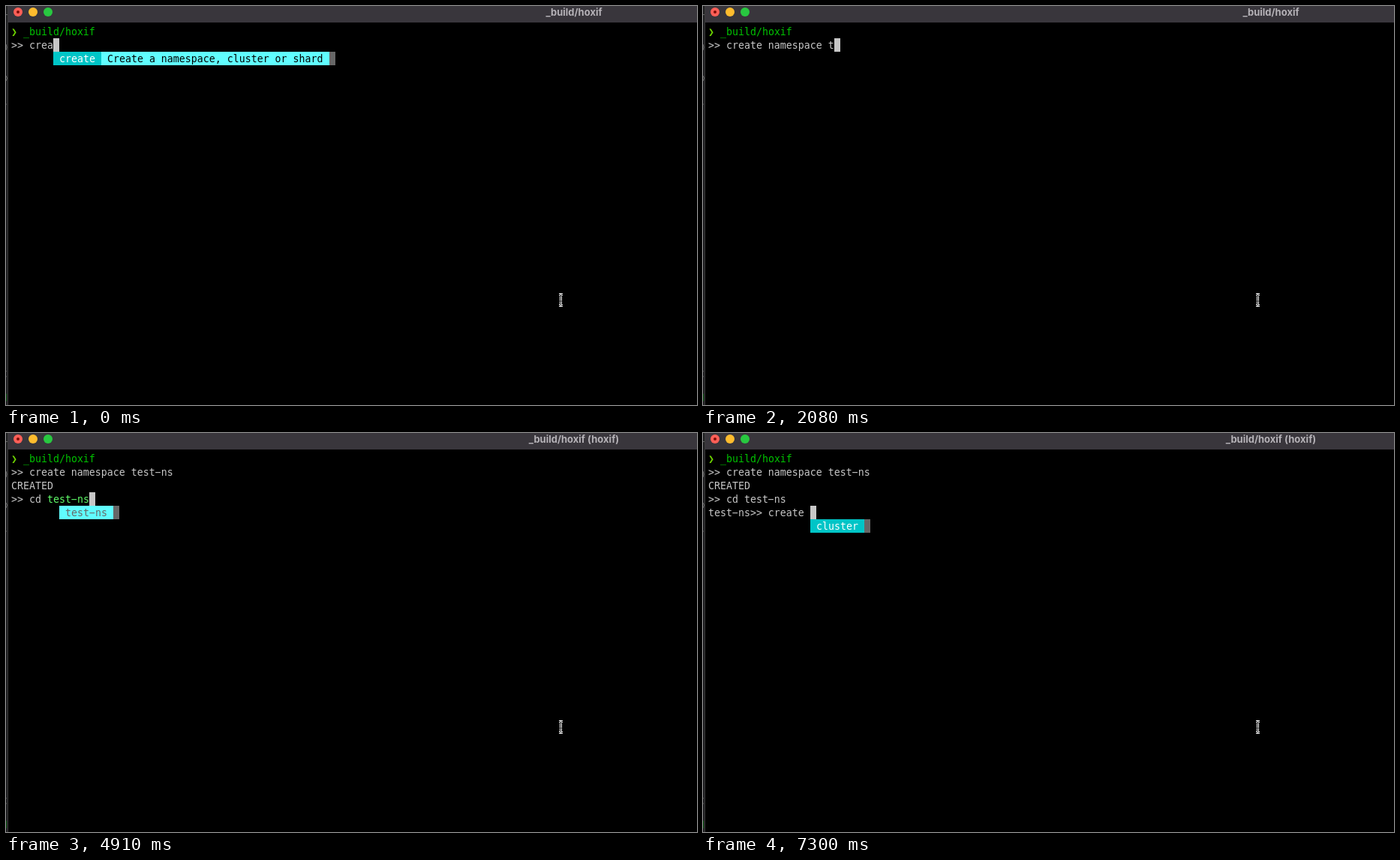
Write an HTML page that moves like this. It is 921 px wide and 532 px high and loops after 8 s.

```html
<!DOCTYPE html>
<html lang="en">
<head>
<meta charset="utf-8">
<title>Terminal</title>
<style>
  html, body { margin: 0; width: 100%; height: 100%; overflow: hidden; background: #000; }
  #stage { position: relative; width: 921px; height: 532px; overflow: hidden; background: #000; }
  #bar { position: absolute; left: 3px; right: 0; top: 0; height: 22px; background: #39363c; }
  #title { position: absolute; left: 657px; top: -1px; width: 200px; text-align: center;
    font: 700 13px/18px Inter, sans-serif; color: #b5b2b7; white-space: pre; }
  svg { position: absolute; left: 0; top: 0; }
  #screen { position: absolute; left: 7px; top: 25px; font: 13.288px/20px "DejaVu Sans Mono", monospace; color: #c7c7c7; }
  #screen span { position: absolute; height: 18px; white-space: pre; }
  #screen .arrow { color: #6fd700; }
  #screen .path { color: #00c200; }
  #screen .preview { color: #5ffa68; }
  #screen .cursor { background: #c7c7c7; }
  #screen .word { background: #00c5c7; color: #fff; }
  #screen .note { background: #60fdff; color: #000; }
  #screen .word.on { background: #60fdff; color: #686868; }
  #screen .note.on { background: #00c5c7; color: #fff; }
  #screen .thumb { background: #676767; }
</style>
</head>
<body>
<div id="stage">
  <div id="bar"></div>
  <div id="title"></div>
  <svg width="921" height="532" viewBox="0 0 921 532" fill="none">
    <path d="M1 0V532" stroke="#1f1f21" stroke-width="2"/>
    <path d="M2.5 0V532" stroke="#3a3a3a"/>
    <path d="M0 11.5h2M0 131h1M0 486v2M0 494h1" stroke="#666"/>
    <path d="M0 51q2 4 0 8M0 93q3 3 0 7" stroke="#777"/>
    <path d="M.5 517v10" stroke="#0d5a14"/>
    <circle cx="16" cy="8" r="6" fill="#ff5f57"/>
    <circle cx="16" cy="8" r="2" fill="#7d0d08"/>
    <circle cx="36" cy="8" r="6" fill="#febc2e"/>
    <circle cx="56" cy="8" r="6" fill="#28c840"/>
    <defs>
      <path id="beam" d="M737 384.500h1.500l1 1 1-1h1.500M739.500 385.500v13M737 399.500h1.500l1-1 1 1h1.500M738.500 393.500h2"/>
    </defs>
    <use href="#beam" stroke="#fff" stroke-width="3"/>
    <use href="#beam" stroke="#000"/>
  </svg>
  <div id="screen"></div>
</div>
<script>
const LOOP = 8000, CELL = 8, ROW = 18;
const NAME = 'hoxif', APP = `_build/${NAME}`;
const screenEl = document.getElementById('screen');
const titleEl = document.getElementById('title');

const create = ['create', 'Create a namespace, cluster or shard'];
const enter = ['cd', 'Enter a namespace, cluster or shard'];
const menus = {
  create: [create],
  both: [enter, create],
  namespace: [['namespace']],
  cluster: [['cluster']],
  space: [['test-ns']]
};

const made = ['>> create namespace test-ns', 'CREATED'];
const entered = [...made, '>> cd test-ns'];
const first = { past: [], prompt: '>> ' };
const second = { past: made, prompt: '>> ' };
const waiting = { past: entered, prompt: '' };
const third = { past: entered, prompt: 'test-ns>> ' };

// start time, session, typed text, menu, chosen suggestion
const steps = [
  [0, first, 'crea', 'create'],
  [290, first, 'creae'],
  [740, first, 'creat', 'create'],
  [890, first, 'create', 'create'],
  [1040, first, 'create', 'create', 'create'],
  [1340, first, 'create ', 'namespace'],
  [1490, first, 'create n', 'namespace'],
  [1630, first, 'create n', 'namespace', 'namespace'],
  [2080, first, 'create namespace t'],
  [2230, first, 'create namespace te'],
  [2380, first, 'create namespace tes'],
  [2530, first, 'create namespace test'],
  [2820, first, 'create namespace test-'],
  [3120, first, 'create namespace test-n'],
  [3270, first, 'create namespace test-ns'],
  [3420, second, ''],
  [4320, second, 'c', 'both'],
  [4470, second, 'cd ', 'space'],
  [4760, second, 'cd te', 'space'],
  [4910, second, 'cd te', 'space', 'test-ns'],
  [5360, waiting, ''],
  [5510, third, ''],
  [5810, third, 'c', 'both'],
  [6100, third, 'cre', 'create'],
  [6250, third, 'crea', 'create'],
  [6850, third, 'crea', 'create', 'create'],
  [7300, third, 'create ', 'cluster']
];

// Wide hyphens, as in the terminal's own typeface
function put(col, row, text, cls = '') {
  const el = document.createElement('span');
  el.className = cls;
  el.style.left = col * CELL + 'px';
  el.style.top = row * ROW + 'px';
  el.textContent = text.replace(/-/g, '\u2212');
  screenEl.append(el);
}

function drawMenu(col, row, items, chosen) {
  const width = Math.max(...items.map(([word]) => word.length));
  const noteWidth = Math.max(...items.map(([, note = '']) => note.length));
  items.forEach(([word, note], i) => {
    const on = word === chosen ? ' on' : '';
    let x = col;
    put(x, row + i, ` ${word.padEnd(width)} `, 'word' + on);
    x += width + 2;
    if (note) {
      put(x, row + i, ` ${note.padEnd(noteWidth)} `, 'note' + on);
      x += noteWidth + 2;
    }
    put(x, row + i, ' ', 'thumb');
  });
}

function draw([, { past, prompt }, typed, menu, chosen = '']) {
  screenEl.replaceChildren();
  put(0, 0, '❯', 'arrow');
  put(2, 0, APP, 'path');
  past.forEach((line, i) => put(0, i + 1, line));
  const row = past.length + 1;
  const kept = prompt + (chosen ? typed.replace(/\S*$/, '') : typed);
  put(0, row, kept);
  put(kept.length, row, chosen, 'preview');
  put(kept.length + chosen.length, row, ' ', 'cursor');
  if (menu) drawMenu(prompt.length + typed.length, row + 1, menus[menu], chosen);
}

let shown;
function tick() {
  const t = performance.now() % LOOP;
  const step = steps.findLast(([start]) => start <= t);
  if (step !== shown) draw(shown = step);
  const title = t < 3570 ? APP : `${APP} (${NAME})`;
  if (titleEl.textContent !== title) titleEl.textContent = title;
  requestAnimationFrame(tick);
}
tick();
</script>
</body>
</html>
```
